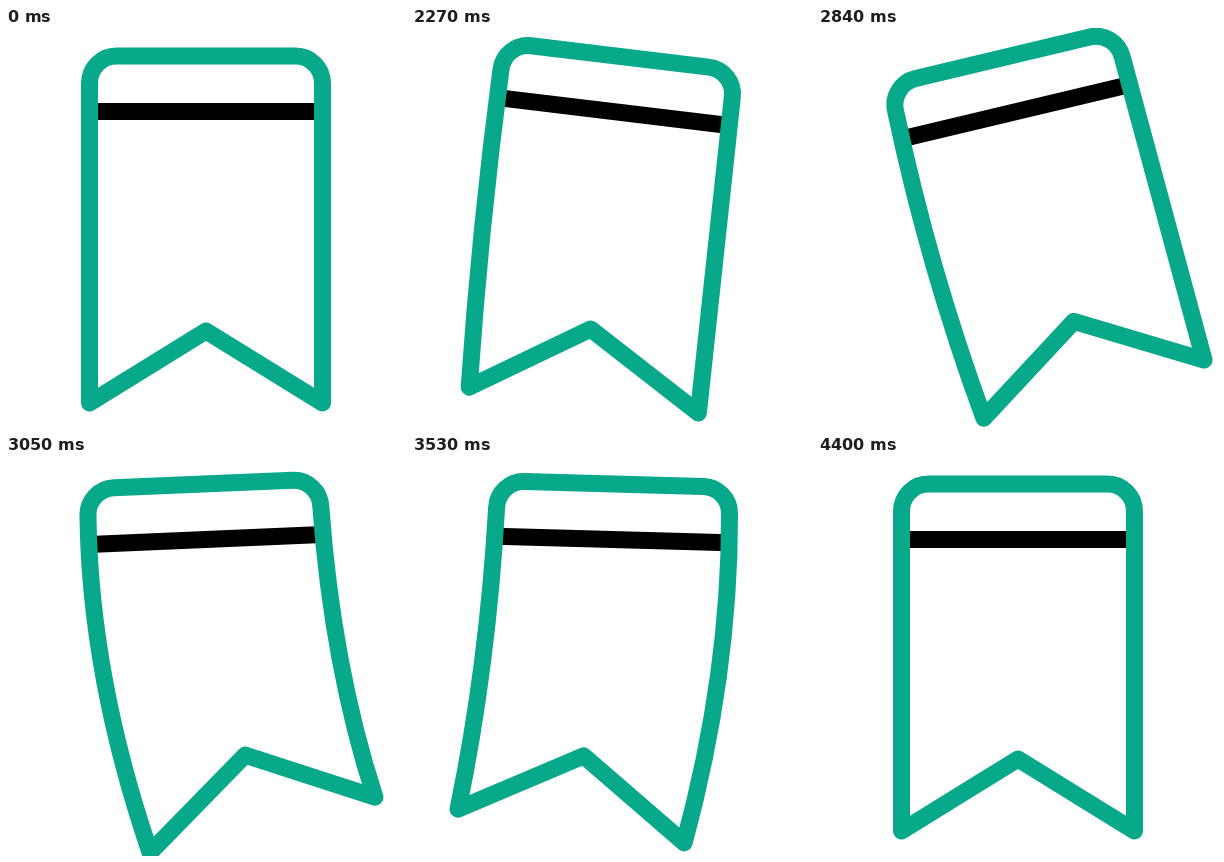
Animation, 400 px wide and 400 px high, one loop 4430 ms. Source, as an HTML page:

```html
<!DOCTYPE html>
<html lang="en">
<head>
<meta charset="utf-8">
<title>Swinging bookmark</title>
<style>
  html, body { margin: 0; width: 100%; height: 100%; overflow: hidden; background: #fff; }
  svg { display: block; width: 100%; height: 100%; }
  path { fill: none; stroke-width: 17; stroke-linejoin: round; }
</style>
</head>
<body>
<svg viewBox="0 0 400 400">
  <g id="bookmark">
    <path d="M83.5 83.5H316.5" stroke="#000"/>
    <path id="outline" stroke="#08a88a"/>
  </g>
</svg>
<script>
const LOOP = 4430, STEP = 30;
const PIVOT = { x: 200, y: 94 };
const HALF = 116.5, SHOULDER = 55, FOOT = 375, NOTCH = 303;

// [time, value] keys: tilt of the top in degrees, sideways travel of the foot
const TILT = [[2000, 0], [2230, 7.2], [2740, -15.2], [3250, 4], [3740, 0]];
const SWAY = [[2000, 0], [2415, -39], [2890, 80], [3450, -44], [4010, 16], [4400, 0]];

const bookmark = document.getElementById('bookmark');
const outline = document.getElementById('outline');
const rad = deg => deg * Math.PI / 180;

function valueAt(keys, t) {
  if (t <= keys[0][0]) return keys[0][1];
  for (let i = 1; i < keys.length; i++) {
    const [t0, v0] = keys[i - 1], [t1, v1] = keys[i];
    if (t < t1) return v0 + (v1 - v0) * (1 - Math.cos(Math.PI * (t - t0) / (t1 - t0))) / 2;
  }
  return keys[keys.length - 1][1];
}

// The foot trails behind the top; bend is its sideways offset in the tilted frame.
// While bent, the foot lifts and narrows a little and the sides bulge outwards.
function outlinePath(bend) {
  const size = Math.abs(bend);
  const slope = Math.sin(rad(-bend * (0.06 + 0.0043 * size)));
  const lift = Math.min(4, size * 0.3);
  const narrow = lift * 0.75, bulge = lift * 1.2;
  const left = 200 - HALF, right = 200 + HALF;
  const footY = FOOT - lift, drop = HALF * slope;
  const bendY = (SHOULDER + FOOT) / 2;
  return `M${left} ${SHOULDER}a27 27 0 0 1 27 -27H${right - 27}a27 27 0 0 1 27 27` +
    `Q${right + bulge} ${bendY} ${right + bend - narrow} ${footY + drop}` +
    `L${200 + bend * 0.68} ${NOTCH - lift * 0.6}` +
    `L${left + bend + narrow} ${footY - drop}` +
    `Q${left - bulge} ${bendY} ${left} ${SHOULDER}Z`;
}

function draw(now) {
  const time = now % LOOP;
  const t = Math.floor((time + 10) / STEP) * STEP - 10;
  const tilt = valueAt(TILT, t), a = rad(tilt);
  const bend = (valueAt(SWAY, t) + (FOOT - PIVOT.y) * Math.sin(a)) / Math.cos(a);
  bookmark.setAttribute('transform', `rotate(${tilt} ${PIVOT.x} ${PIVOT.y})`);
  outline.setAttribute('d', outlinePath(bend));
}

const start = performance.now();
function tick() {
  draw(performance.now() - start);
  requestAnimationFrame(tick);
}
tick();
</script>
</body>
</html>
```
